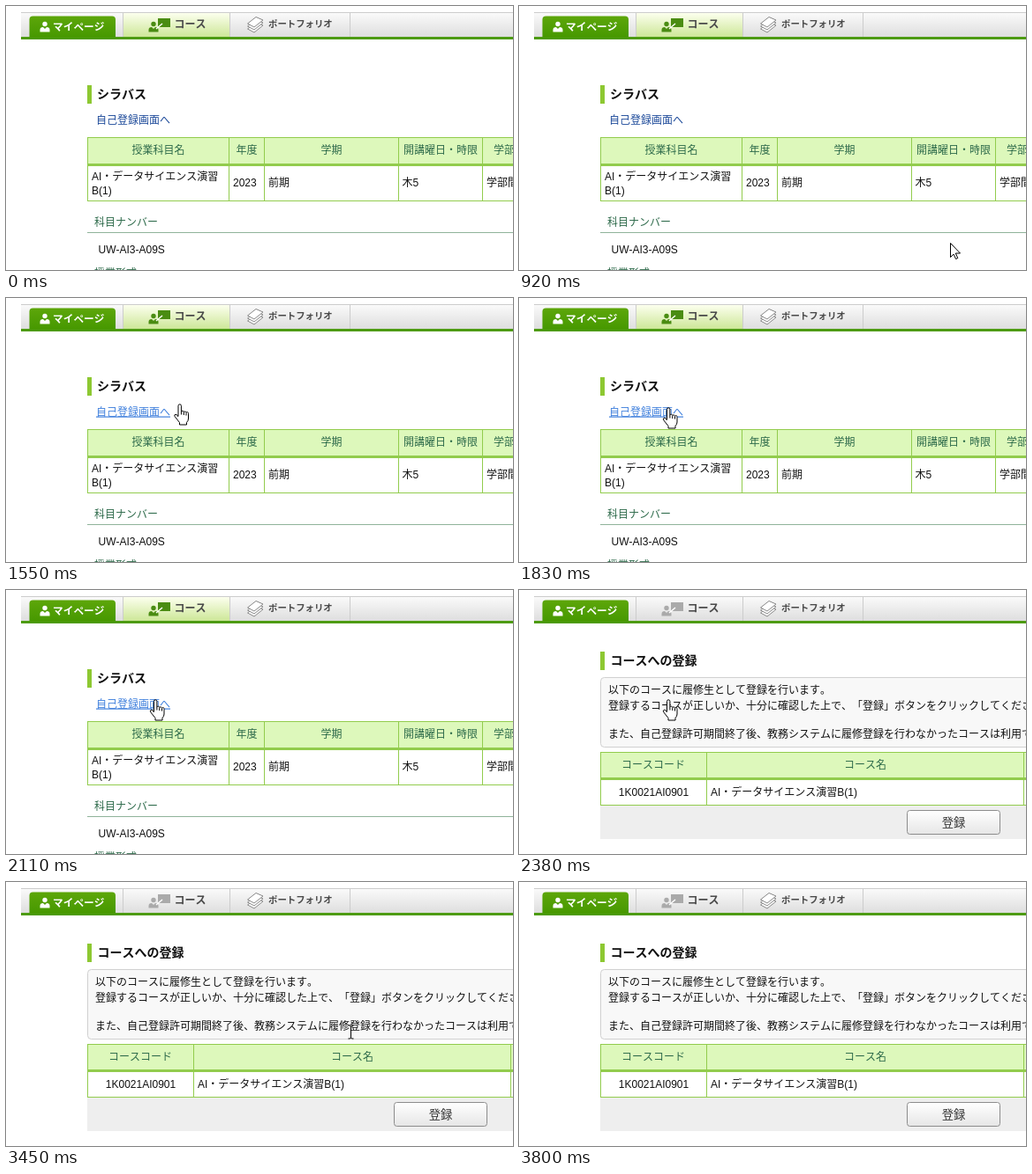
Recreate the animation shown at these times as an HTML page. Size 574x300 px, loop 4200 ms.

```html
<!DOCTYPE html>
<html lang="ja">
<head>
<meta charset="utf-8">
<title>自己登録</title>
<style>
html, body { margin: 0; width: 100%; height: 100%; overflow: hidden; background: #fff; }
svg { display: block; }
text {
  font: 12px "Liberation Sans", "Noto Sans CJK JP", "Noto Sans CJK", sans-serif; fill: #111;
  text-spacing-trim: space-all; font-kerning: none; font-feature-settings: "chws" 0, "palt" 0;
}
.mid { text-anchor: middle; }
.title { font-size: 14px; font-weight: bold; }
.head { font-weight: 500; fill: #2d6a4a; }
.tab { font-weight: bold; fill: #4a4a4a; }
rect, .grid { shape-rendering: crispEdges; }
.soft { shape-rendering: auto; }
.grid { fill: none; stroke: #92cc4d; }
.bar { fill: #8dc832; }
.th { fill: #ddf8bb; }
#link { fill: #1d4a9a; }
#link.hover { fill: #4080dd; text-decoration: underline; }
.ptr { fill: #fff; stroke: #000; stroke-linejoin: round; }
#beam { fill: none; }
</style>
</head>
<body>
<svg width="574" height="300" viewBox="0 0 574 300">
  <defs>
    <linearGradient id="gray" x2="0" y2="1"><stop stop-color="#fbfbfb"/><stop offset="1" stop-color="#dedede"/></linearGradient>
    <linearGradient id="lime" x2="0" y2="1"><stop stop-color="#fcffee"/><stop offset="1" stop-color="#cde798"/></linearGradient>
    <linearGradient id="green" x2="0" y2="1"><stop stop-color="#5da60a"/><stop offset="1" stop-color="#469800"/></linearGradient>
    <linearGradient id="btn" x2="0" y2="1"><stop stop-color="#fff"/><stop offset="1" stop-color="#e6e6e6"/></linearGradient>
    <g id="person"><circle cy="-3.500" r="2.700"/><path d="M-5.500 5.500V3Q-5.500 0-2 0L0 2 2 0Q5.500 0 5.500 3V5.500Z"/></g>
    <g id="course">
      <use href="#person" x="167" y="24"/>
      <rect x="172" y="14" width="14" height="10"/>
      <path d="M170 26L177 20" stroke="#fff" stroke-width="1.5"/>
    </g>
    <path id="sheet" d="M273.500 20L283 12.500 291 16 281 24Z" fill="#fff" stroke="#888"/>
  </defs>

  <!-- header -->
  <rect x="17" y="7" width="557" height="28" fill="url(#gray)"/>
  <rect x="17" y="7" width="557" height="1" fill="#ccc"/>
  <rect id="lit" x="133" y="8" width="121" height="27" fill="url(#lime)"/>
  <path class="grid" d="M132.500 8V35M253.500 8V35M389.500 8V35" style="stroke:#ccc"/>
  <rect x="17" y="35" width="557" height="3" fill="#4d9b12"/>
  <path d="M26.500 36V15.500Q26.500 11.500 30.500 11.500H120Q124 11.500 124 15.500V36Z" fill="url(#green)"/>
  <use href="#person" x="44" y="24" fill="#fff"/>
  <text class="tab" x="53" y="27.500" style="font-size:11.700px;fill:#fff">マイページ</text>
  <use id="icon" href="#course"/>
  <text class="tab" x="190.500" y="25">コース</text>
  <use href="#sheet" y="6"/><use href="#sheet" y="3"/><use href="#sheet"/>
  <text class="tab" x="297" y="24" style="font-size:10.400px">ポートフォリオ</text>

  <g id="syllabus">
    <rect class="bar" x="92" y="90" width="5" height="21"/>
    <text class="title" x="103" y="105">シラバス</text>
    <text id="link" x="102" y="133.500">自己登録画面へ</text>
    <rect class="th" x="92" y="149" width="482" height="31"/>
    <path class="grid" d="M574 149.500H92.500V221.500H574M252.500 149V221M292.500 149V221M444.500 149V221M539.500 149V221"/>
    <path class="grid" d="M92 180.500H574" stroke-width="3"/>
    <g class="mid">
      <text class="head" x="172.500" y="168">授業科目名</text>
      <text class="head" x="272.500" y="168">年度</text>
      <text class="head" x="368.500" y="168">学期</text>
      <text class="head" x="492" y="168">開講曜日・時限</text>
    </g>
    <text class="head" x="552" y="168">学部</text>
    <text x="97" y="198">AI・データサイエンス演習</text>
    <text x="97" y="214">B(1)</text>
    <text x="257" y="205">2023</text>
    <text x="297" y="205">前期</text>
    <text x="448.500" y="205">木5</text>
    <text x="544" y="205">学部間</text>
    <text class="head" x="100" y="250">科目ナンバー</text>
    <rect x="92" y="257" width="482" height="1" fill="#8fb39a"/>
    <text x="104.500" y="281">UW-AI3-A09S</text>
    <text class="head" x="100" y="307.500">授業形式</text>
  </g>

  <g id="entry">
    <rect class="bar" x="92" y="70" width="5" height="21"/>
    <text class="title" x="103.500" y="84.500">コースへの登録</text>
    <rect class="soft" x="92.500" y="99.500" width="500" height="79" rx="4" fill="#f8f8f8" stroke="#d0d0d0"/>
    <text x="101" y="118">以下のコースに履修生として登録を行います。</text>
    <text x="101" y="136">登録するコースが正しいか、十分に確認した上で、「登録」ボタンをクリックしてください。</text>
    <text x="101" y="168">また、自己登録許可期間終了後、教務システムに履修登録を行わなかったコースは利用で</text>
    <rect class="th" x="92" y="184" width="482" height="30"/>
    <rect x="92" y="245" width="482" height="38" fill="#eee"/>
    <path class="grid" d="M574 184.500H92.500V244.500H574M212.500 184V244M571.500 184V244"/>
    <path class="grid" d="M92 214.500H574" stroke-width="3"/>
    <g class="mid">
      <text class="head" x="152" y="203">コースコード</text>
      <text class="head" x="392" y="203">コース名</text>
      <text x="152.500" y="234">1K0021AI0901</text>
    </g>
    <text x="217" y="234">AI・データサイエンス演習B(1)</text>
    <rect class="soft" x="439.500" y="250.500" width="105" height="27" rx="3" fill="url(#btn)" stroke="#8c8c8c"/>
    <text class="mid" x="492" y="268.500" style="font-size:13.300px;fill:#333">登録</text>
  </g>

  <g id="cursor">
    <path id="arrow" class="ptr" d="M.5 .5V16.500L4 13 6.600 18.500 8.800 17.500 6.300 12H11.500Z"/>
    <path id="hand" class="ptr" d="M-1.500 13V1.500A1.700 1.700 0 0 1 1.900 1.500V8A1.600 1.600 0 0 1 4.800 8.400 1.600 1.600 0 0 1 7.500 9.300 1.400 1.400 0 0 1 10 10.500V16Q10 18.500 8 20.500V23H0V20.500L-5.500 13.500Q-6.200 11.500-4.500 11.200T-1.500 14M1.900 8V11.500M4.800 8.500V12M7.500 9.500V12.500"/>
    <path id="beam" class="ptr" d="M-3 -7.500H-1L0 -6.500 1 -7.500H3M0 -6.500V6.500M-3 7.500H-1L0 6.500 1 7.500H3"/>
  </g>
  <circle id="click" cx="168" cy="125" r="12" fill="#ff0" fill-opacity=".47"/>
</svg>
<script>
const LOOP = 4200, STEP = 70, ENTER = 920, HOVER = 1410, SWITCH = 2380, MOVE = 3030, LEAVE = 3800;
const $ = id => document.getElementById(id);
const show = (id, on) => $(id).style.display = on ? '' : 'none';

// pointer stops: time, x, y, easing power
const stops = [
  [ENTER, 488, 269, 1.5], [HOVER, 219, 125, 1], [1550, 196.5, 121, 1], [1830, 169, 125, 1],
  [2960, 169, 125, 1], [MOVE, 175, 122, 1], [3170, 218, 122, 1], [3450, 390.5, 170.5, 1],
  [3520, 423, 207, 1], [3730, 532, 285, 1], [LEAVE, 568, 311, 1]
];

function pointer(t) {
  const start = t < MOVE ? ENTER : MOVE;
  t = start + Math.floor((t - start) / STEP) * STEP;
  if (start === ENTER) t = Math.min(t, 1830);
  const i = stops.findIndex((s, n) => n > 0 && t <= s[0]);
  const [t0, x0, y0, power] = stops[i - 1], [t1, x1, y1] = stops[i];
  const p = 1 - (1 - (t - t0) / (t1 - t0)) ** power;
  return [x0 + (x1 - x0) * p, y0 + (y1 - y0) * p];
}

function draw(t) {
  const first = t < SWITCH, visible = t >= ENTER && t < LEAVE;
  show('syllabus', first);
  show('entry', !first);
  show('lit', first);
  $('icon').setAttribute('fill', first ? '#4a8c12' : '#aaa');
  $('link').classList.toggle('hover', t >= HOVER);
  show('click', t >= 2020 && t < 2110);
  show('cursor', visible);
  if (!visible) return;
  const shape = t < HOVER || t >= 3520 ? 'arrow' : t < MOVE ? 'hand' : 'beam';
  for (const id of ['arrow', 'hand', 'beam']) show(id, id === shape);
  $('cursor').setAttribute('transform', `translate(${pointer(t)})`);
}

const begin = performance.now();
function tick() {
  draw((performance.now() - begin) % LOOP);
  requestAnimationFrame(tick);
}
tick();
</script>
</body>
</html>
```
